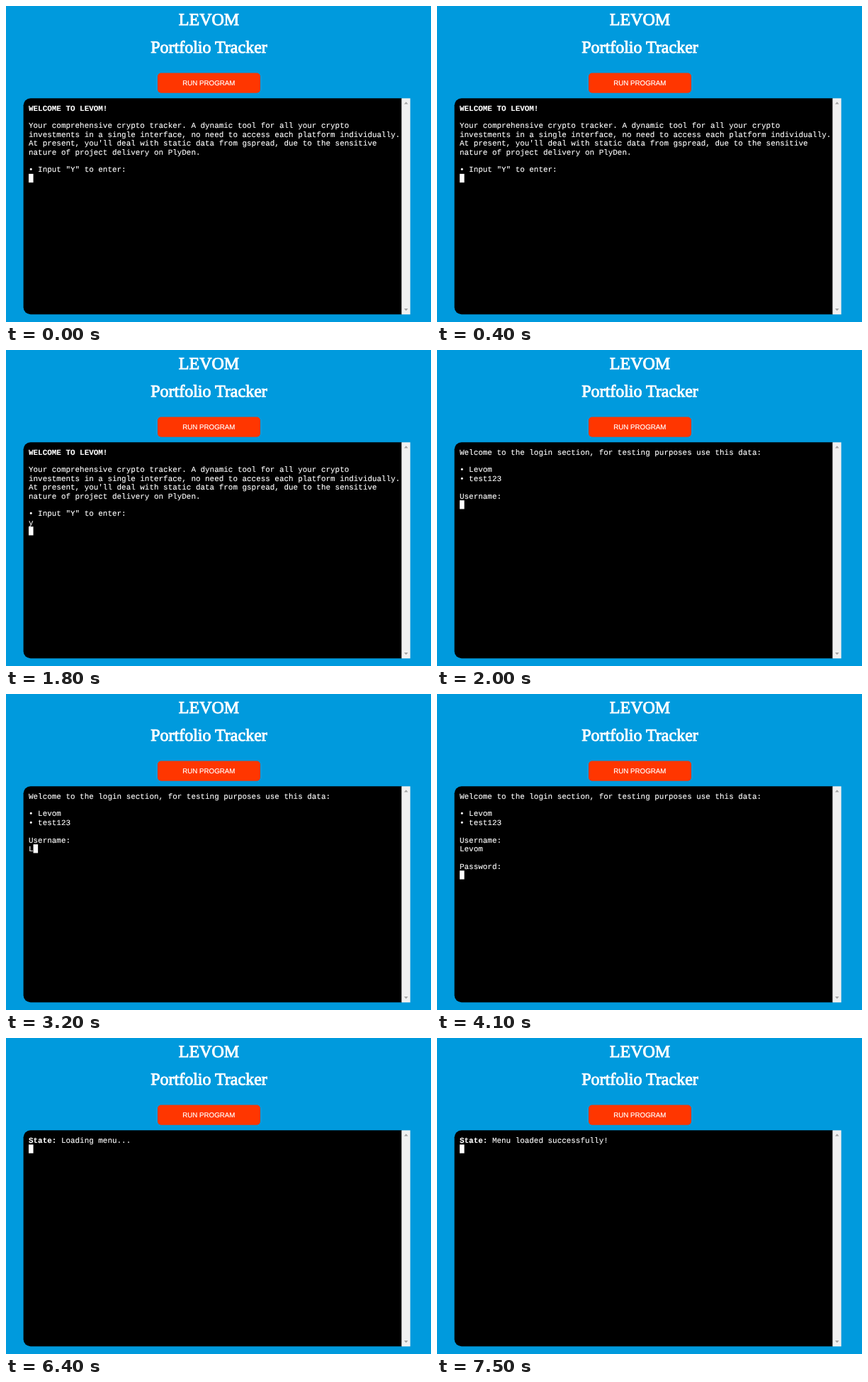
Write an HTML page that moves like this. It is 600 px wide and 446 px high and loops after 8 s.

```html
<!DOCTYPE html>
<html lang="en">
<head>
<meta charset="utf-8">
<title>Portfolio Tracker</title>
<style>
html, body { margin: 0; width: 100%; height: 100%; overflow: hidden; background: #009add; }
svg { display: block; width: 600px; height: 446px; }
text { fill: #fff; white-space: pre; text-rendering: geometricPrecision; }
.title { font: 24px "Liberation Serif", serif; text-anchor: middle; stroke: #fff; stroke-width: .95px; }
.button { font: 9.75px "Liberation Sans", sans-serif; text-anchor: middle; stroke: #fff; stroke-width: .2px; }
#rows text { font: 10.93px "Liberation Mono", monospace; stroke: #fff; stroke-width: .12px; }
#rows .bold { font-weight: bold; }
</style>
</head>
<body>
<svg viewBox="0 0 600 446">
  <rect width="600" height="446" fill="#009add"/>
  <text class="title" x="286.5" y="26.5">LEVOM</text>
  <text class="title" x="286.5" y="65.8">Portfolio Tracker</text>
  <rect x="214" y="94.6" width="145" height="28.1" rx="5" fill="#ff3600"/>
  <text class="button" x="286.3" y="112.2">RUN PROGRAM</text>
  <path d="M559 130.3H34.6a10 10 0 0 0-10 10V425.3a10 10 0 0 0 10 10H559z" fill="#000"/>
  <rect x="558.4" y="130.3" width="12.3" height="305" fill="#f1f1f1"/>
  <path d="M562 138.5l2.8-3.2 2.8 3.2zM562 427l2.8 3.2 2.8-3.2z" fill="#a3a3a3"/>
  <g id="rows"></g>
  <rect id="cursor" width="6.56" height="12.3" fill="#fff"/>
</svg>
<script>
const LOOP = 8000, LEFT = 32, TOP = 138, PITCH = 12.36, CELL = 6.56;
const NS = "http://www.w3.org/2000/svg";
const rowGroup = document.getElementById("rows");
const cursor = document.getElementById("cursor");

// Text between asterisks is bold; the cursor follows the last character.
const intro = `*WELCOME TO LEVOM!*

Your comprehensive crypto tracker. A dynamic tool for all your crypto
investments in a single interface, no need to access each platform individually.
At present, you'll deal with static data from gspread, due to the sensitive
nature of project delivery on PlyDen.

• Input "Y" to enter:
`;
const login = `Welcome to the login section, for testing purposes use this data:

• Levom
• test123

Username:
`;
const password = login + "Levom\n\nPassword:\n";

const steps = [
  [0, intro],
  [1500, intro + "y"],
  [1700, intro + "y\n"],
  [1900, login],
  [3100, login + "L"],
  [3300, login + "Le"],
  [3400, login + "Lev"],
  [3600, login + "Levo"],
  [3800, login + "Levom"],
  [4000, password],
  [5900, password + "\n"],
  [6400, "*State:* Loading menu...\n"],
  [7400, "*State:* Menu loaded successfully!\n"]
];

function make(name, parent) {
  return parent.appendChild(document.createElementNS(NS, name));
}

function show(screen) {
  rowGroup.replaceChildren();
  const lines = screen.split("\n");
  lines.forEach((line, i) => {
    const row = make("text", rowGroup);
    row.setAttribute("x", LEFT);
    row.setAttribute("y", TOP + i * PITCH + 9.7);
    line.split("*").forEach((part, k) => {
      const span = make("tspan", row);
      span.textContent = part;
      if (k % 2) span.setAttribute("class", "bold");
    });
  });
  const last = lines.length - 1;
  cursor.setAttribute("x", LEFT + lines[last].length * CELL);
  cursor.setAttribute("y", TOP + last * PITCH);
}

let start = null, current = null;
function frame(now) {
  start ??= now;
  const t = (now - start) % LOOP;
  const step = steps.findLast(([at]) => at <= t);
  if (step !== current) show((current = step)[1]);
  requestAnimationFrame(frame);
}
show(intro);
requestAnimationFrame(frame);
</script>
</body>
</html>
```
